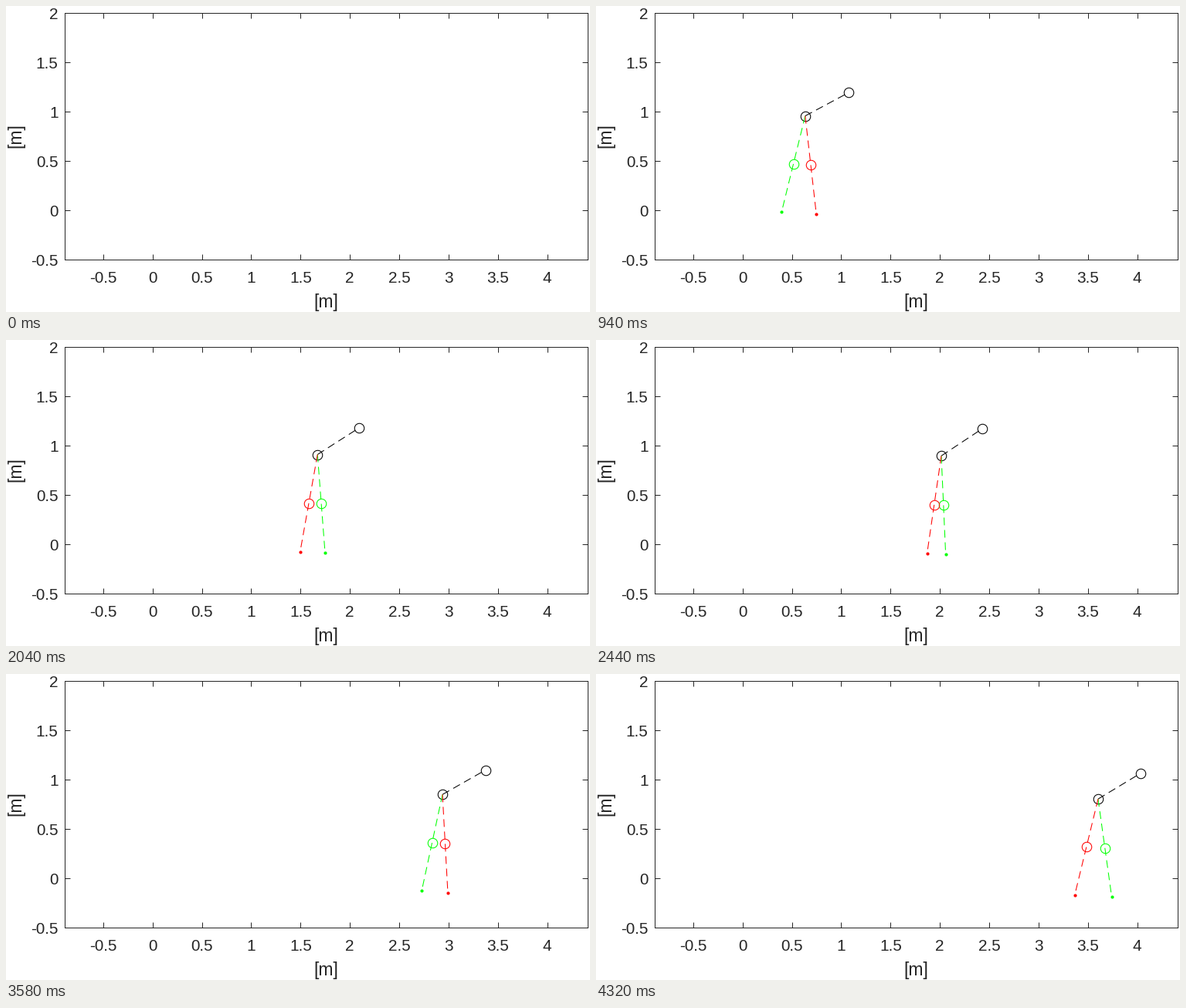
Animation, 756 px wide and 397 px high, one loop 4.34 s. Source, as a matplotlib script:

```python
import numpy as np
import matplotlib.pyplot as plt
from matplotlib.animation import FuncAnimation

W, H, DPI = 756, 397, 100
PT = 72 / DPI                      # points per pixel
INK = "#262626"
FRAMES, INTERVAL = 217, 20

plt.rcParams["font.family"] = "Liberation Sans"
plt.rcParams["axes.unicode_minus"] = False

# Stage pixels of the plot box and of the data origin
LEFT, RIGHT, TOP, BOTTOM = 76, 753, 9, 329
X0, Y0, SX, SY = 189.6, 265.0, 127.8, 128.0

# Walker geometry in metres and radians
LEG, TORSO, STEP, SLOPE = 1.0, 0.5, 0.374, 0.05
HALF = np.arcsin(STEP / np.cos(SLOPE) / 2 / LEG)
STEPS = 10

# Cadence: gait cycles completed against frame count
CAD_T = [1, 27, 47, 70, 102, 142, 179, 216]
CAD_N = [0, 1.14, 2.094, 3.247, 4.79, 6.62, 8.27, 10]

# Torso lean from the vertical over one step
LEAN_T = [0, 0.1, 0.25, 0.63, 0.78, 1]
LEAN_DEG = [58.8, 62, 60.6, 55.6, 57.3, 58.8]

fig = plt.figure(figsize=(W / DPI, H / DPI), dpi=DPI, facecolor="white")
ax = fig.add_axes([LEFT / W, 1 - BOTTOM / H, (RIGHT - LEFT) / W, (BOTTOM - TOP) / H])
ax.set_xlim((LEFT - X0) / SX, (RIGHT - X0) / SX)
ax.set_ylim(-0.5, 2)
ax.set_xticks(np.arange(-0.5, 4.1, 0.5))
ax.set_yticks(np.arange(-0.5, 2.1, 0.5))
ax.tick_params(direction="in", length=7 * PT, width=PT, color=INK,
               top=True, right=True, labelbottom=False, labelleft=False)
for spine in ax.spines.values():
    spine.set(linewidth=PT, edgecolor=INK)


def label(x, y, text, size, ha="center", rotation=0):
    fig.text(x / W, 1 - y / H, text, fontsize=size * PT, color=INK, ha=ha,
             va="baseline", rotation=rotation, rotation_mode="anchor")


for v in ax.get_xticks():
    label(X0 + SX * v, 358.6, f"{v:g}", 20.8)
for v in ax.get_yticks():
    label(67.5, Y0 - SY * v + 7.6, f"{v:g}", 20.8, ha="right")
label(414.5, 390.5, "[m]", 22.9)
label(19.5, 168, "[m]", 22.9, rotation=90)


def dashed(color):
    return ax.plot([], [], color=color, lw=0.75, dashes=(9.6, 5.8),
                   dash_capstyle="butt")[0]


def ring(color):
    return ax.plot([], [], "o", ms=9, mfc="none", mec=color, mew=0.75)[0]


def dot(color):
    return ax.plot([], [], "o", ms=3, color=color, mew=0)[0]


torso, joints = dashed("black"), ring("black")
swing_leg = dashed("lime"), ring("lime"), dot("lime")
stance_leg = dashed("red"), ring("red"), dot("red")
artists = [torso, joints, *swing_leg, *stance_leg]


def polar(angle, length):
    """Vector of given length, angle measured clockwise from straight up."""
    return length * np.array([np.sin(angle), np.cos(angle)])


def draw_leg(leg, hip, foot):
    line, mass, tip = leg
    mid = (hip + foot) / 2
    line.set_data(*zip(hip, foot))
    mass.set_data([mid[0]], [mid[1]])
    tip.set_data([foot[0]], [foot[1]])


def pose(k):
    cycles = np.interp(k, CAD_T, CAD_N)
    n = min(int(cycles), STEPS - 1)
    t = cycles - n

    # Stance leg is slow near impacts; the swing leg lags at first
    u = t - 0.3 * np.sin(2 * np.pi * t) / (2 * np.pi)
    v = u - 0.155 * np.sin(np.pi * min(t / 0.6, 1))
    stance = SLOPE - HALF + 2 * HALF * u
    swing = SLOPE + HALF - 2 * HALF * v
    if n == 0:
        swing += 0.02 * (1 - t)    # wider opening stance

    planted = n * STEP * np.array([1, -np.tan(SLOPE)])
    hip = planted + polar(stance, LEG)
    free = hip - polar(swing, LEG)
    head = hip + polar(np.radians(np.interp(t, LEAN_T, LEAN_DEG)), TORSO)
    return planted, free, hip, head


def update(k):
    for artist in artists:
        artist.set_visible(k > 0)
    if k > 0:
        planted, free, hip, head = pose(k)
        torso.set_data(*zip(hip, head))
        joints.set_data(*zip(hip, head))
        draw_leg(stance_leg, hip, planted)
        draw_leg(swing_leg, hip, free)
    return artists


anim = FuncAnimation(fig, update, frames=FRAMES, interval=INTERVAL,
                     init_func=lambda: update(0), repeat=True, repeat_delay=0)
plt.show()
```
